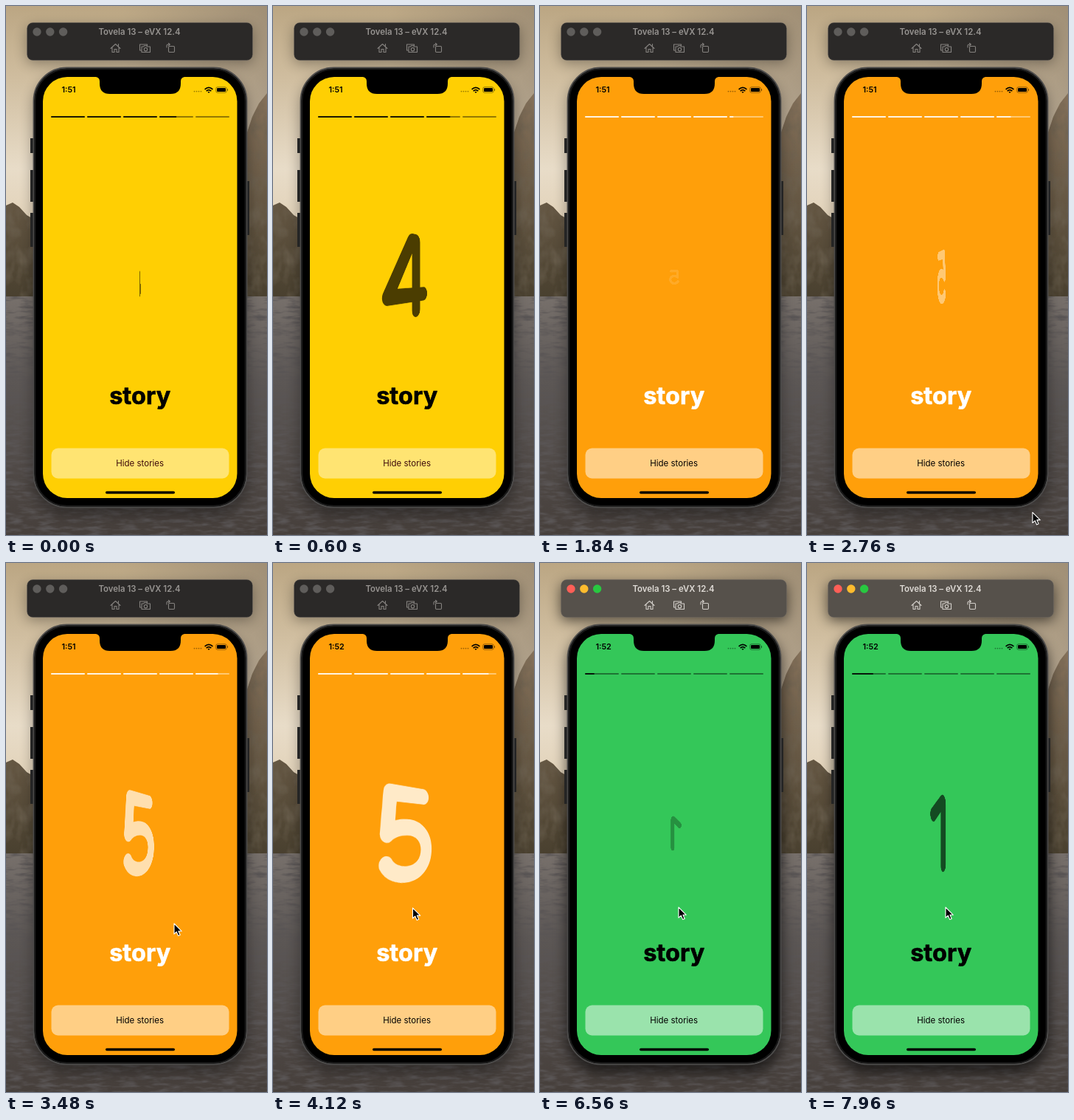
Animation, 354 px wide and 716 px high, one loop 8000 ms. Source, as an HTML page:

```html
<!DOCTYPE html>
<html lang="en">
<head>
<meta charset="utf-8">
<title>Stories</title>
<style>
  html, body { margin: 0; width: 100%; height: 100%; overflow: hidden; background: #4c4643; }
  svg { position: absolute; left: 0; top: 0; display: block; }
  text { font-family: Inter, Roboto, sans-serif; }
  #digit { left: 82px; top: 265px; overflow: visible; fill: none; stroke-linecap: round; stroke-linejoin: round; }
</style>
</head>
<body>
<svg id="back" width="354" height="716" viewBox="0 0 354 716">
  <defs>
    <linearGradient id="sky" x2="0" y2="1">
      <stop offset="0" stop-color="#bba683"/>
      <stop offset=".25" stop-color="#d0bea0"/>
      <stop offset=".55" stop-color="#e8dcc8"/>
      <stop offset="1" stop-color="#d8c3a2"/>
    </linearGradient>
    <linearGradient id="dusk">
      <stop offset=".45" stop-color="#8a7c6a" stop-opacity="0"/>
      <stop offset="1" stop-color="#8a7c6a" stop-opacity=".55"/>
    </linearGradient>
    <linearGradient id="hill" x2="0" y2="1">
      <stop offset="0" stop-color="#85715a"/>
      <stop offset="1" stop-color="#49402f"/>
    </linearGradient>
    <linearGradient id="sea" x2="0" y2="1">
      <stop offset="0" stop-color="#77706b"/>
      <stop offset=".35" stop-color="#5c5755"/>
      <stop offset="1" stop-color="#463f3b"/>
    </linearGradient>
    <filter id="waves" x="0" y="0" width="1" height="1">
      <feTurbulence type="fractalNoise" baseFrequency=".045 .2" numOctaves="3" seed="4"/>
      <feColorMatrix values="0 0 0 0 .1  0 0 0 0 .09  0 0 0 0 .09  2.6 0 0 0 -1.1"/>
    </filter>
    <filter id="rock" x="0" y="0" width="1" height="1">
      <feTurbulence type="fractalNoise" baseFrequency=".06 .04" numOctaves="3" seed="9"/>
      <feColorMatrix values="0 0 0 0 .15  0 0 0 0 .12  0 0 0 0 .08  1.8 0 0 0 -.75"/>
      <feComposite in2="SourceGraphic" operator="in"/>
    </filter>
    <filter id="soft" x="-.3" y="-.3" width="1.6" height="1.6"><feGaussianBlur stdDeviation="9"/></filter>
  </defs>

  <rect width="354" height="400" fill="url(#sky)"/>
  <rect width="354" height="400" fill="url(#dusk)"/>
  <g id="hills"></g>
  <rect y="393" width="354" height="323" fill="url(#sea)"/>
  <rect y="393" width="354" height="323" filter="url(#waves)"/>

  <g id="shadow" filter="url(#soft)">
    <rect x="28" y="28" width="307" height="50" rx="8"/>
    <rect x="36" y="92" width="292" height="598" rx="46"/>
  </g>

  <rect id="bar" x="28.5" y="22.5" width="306" height="51" rx="8" stroke="#77706a" stroke-opacity=".35"/>
  <g id="lights"></g>
  <text id="title" x="181" y="39" font-size="11.4" font-weight="600" text-anchor="middle">Tovela 13 – eVX 12.4</text>
  <g id="icons" fill="none" stroke-width="1.1" stroke-linejoin="round" stroke-linecap="round">
    <path d="M142 57.5L148.500 51.500 155 57.500M144 56.500V62.500H147V58.500H150V62.500H153V56.500M152.500 54V51.500"/>
    <path d="M183 60H181.500V52H191.500V53.500M184 55H186.500L187.500 53.800H190.500L191.500 55H195.500V62.500H184Z"/>
    <circle cx="189.500" cy="58.700" r="2.200"/>
    <rect x="220.500" y="54.500" width="8" height="8" rx="1.200"/>
    <path d="M218 56V53.500Q218 52 220 52H222M220.500 50.300L222.300 52 220.500 53.700"/>
  </g>

  <g fill="#242424">
    <path d="M33 179h5v20h-5zM33 222h5v43h-5zM33 280h5v46h-5zM326 237h4v73h-4z"/>
  </g>
  <rect x="37.500" y="83.500" width="289" height="595" rx="45" fill="#000" stroke="#4d4c4b" stroke-width="1.800"/>
  <rect x="39.500" y="85.500" width="285" height="591" rx="43" fill="none" stroke="#1b1b1b" stroke-width="1.500"/>
  <rect id="screen" x="50" y="96" width="263.500" height="570" rx="33"/>
  <path d="M122 95H242V96Q237 97 237 102V105Q237 119 223 119H141Q127 119 127 105V102Q127 97 122 96Z"/>

  <text id="clock" x="75.500" y="117.300" font-size="10.800" font-weight="600"></text>
  <g id="cell" opacity=".4"></g>
  <g fill="none" stroke="#000" stroke-width="1.700">
    <path d="M269.600 112.800Q275 107.800 280.400 112.800M271.700 115.100Q275 112 278.300 115.100"/>
    <path d="M273.500 116.300Q275 115.200 276.500 116.300L275 117.900Z" fill="#000" stroke="none"/>
    <rect x="284.700" y="109.700" width="14.600" height="7.600" rx="2.300" stroke-width=".8" opacity=".5"/>
    <path d="M300.600 112.200V114.800" stroke-width="1" opacity=".5"/>
    <rect x="286" y="111" width="12" height="5" rx="1.200" fill="#000" stroke="none"/>
  </g>
  <g id="tracks"></g>

  <text id="story" x="181.700" y="538.500" font-size="32.500" font-weight="700" text-anchor="middle" stroke-width=".7" stroke-linejoin="round">story</text>
  <rect id="button" x="61.500" y="598.500" width="241" height="41" rx="9" fill="#fff"/>
  <text id="hide" x="181.700" y="623" font-size="11.500" text-anchor="middle">Hide stories</text>
  <rect x="135" y="656.800" width="94" height="3.400" rx="1.700"/>
</svg>

<svg id="digit" width="200" height="200" viewBox="-100 -100 200 200"><path id="glyph" stroke-width="28.500"/></svg>

<svg width="354" height="716" viewBox="0 0 354 716">
  <path id="cursor" d="M0 0V14.200L3.300 11.200 5.700 16.600 8.200 15.500 5.900 10.300H10.300Z" stroke="#fff" stroke-width="1.100" stroke-linejoin="round"/>
</svg>

<script>
const LOOP = 8000;
const $ = id => document.getElementById(id);
const set = (el, attrs) => { for (const k in attrs) el.setAttribute(k, attrs[k]); return el; };
const add = (parent, tag, attrs) =>
  parent.appendChild(set(document.createElementNS('http://www.w3.org/2000/svg', tag), attrs));
const lerp = (a, b, u) => a + (b - a) * u;

const glyphs = {
  1: 'M-39 -38L6 -69Q12 -72 12 -64V70',
  4: 'M57 38H-56L14 -66Q16 -69 20 -69H30V69',
  5: 'M39 -69H-36L-43 0C-33 -8 -18 -12 0 -12C28 -12 47 5 47 28C47 53 28 70 0 70C-20 70 -38 62 -45 50'
};

// Each story: look, then [time, progress] points
const stories = [
  { n: 4, bg: '#ffcf03', ink: '#000', hide: '#3d0a0a', y: 365, glass: .44, keys: [[0, .507], [1486, 1]] },
  { n: 5, bg: '#ff9f0a', ink: '#fff', hide: '#000', y: 366.5, glass: .5, keys: [[1486, 0], [3480, .67], [5200, .955], [5420, 1]] },
  { n: 1, bg: '#34c759', ink: '#000', hide: '#000', y: 365.5, glass: .5, keys: [[5420, 0], [6560, .28], [8000, .64]] }
];
const pointer = [[2600, 318, 716], [3300, 228, 488], [3520, 228, 488], [4200, 188, 466], [LOOP, 188, 466]];
const ACTIVE = 4640, MINUTE = 4080;

// Interpolates the values of timed points
function track(keys, t, ease = u => u) {
  let i = 1;
  while (i < keys.length - 1 && t > keys[i][0]) i++;
  const [a, b] = [keys[i - 1], keys[i]];
  const u = ease(Math.min(1, Math.max(0, (t - a[0]) / (b[0] - a[0]))));
  return a.slice(1).map((v, k) => lerp(v, b[k + 1], u));
}
const smooth = u => u * u * (3 - 2 * u);

const ridges = 'M0 270L9 266 18 272 28 283 40 290 80 330 110 394H0ZM354 118L343 132 334 150 326 174 300 240 270 394H354Z';
add($('hills'), 'path', { d: ridges, fill: 'url(#hill)' });
add($('hills'), 'path', { d: ridges, filter: 'url(#rock)' });

const lights = ['#ff5f57', '#febc2e', '#28c840'].map((color, i) =>
  ({ color, el: add($('lights'), 'circle', { cx: 42 + i * 17.8, cy: 35, r: 5.7 }) }));
for (let i = 0; i < 4; i++) add($('cell'), 'circle', { cx: 255.5 + i * 3, cy: 115.6, r: .9 });

const bars = [0, 1, 2, 3, 4].map(i => {
  const box = { x: 61 + i * 49, y: 149, width: 46, height: 2, rx: 1 };
  return { rail: add($('tracks'), 'rect', { ...box, opacity: .42 }), fill: add($('tracks'), 'rect', { ...box, opacity: .8 }) };
});

function drawWindow(active) {
  set($('bar'), { fill: active ? '#56514b' : '#2b2928' });
  set($('title'), { fill: active ? '#dfdbd6' : '#979491' });
  set($('icons'), { stroke: active ? '#d3cfca' : '#85827f' });
  set($('shadow'), { opacity: active ? .6 : .32 });
  lights.forEach(l => set(l.el, { fill: active ? l.color : '#5f5d5b' }));
}

function drawStory(s, p) {
  set($('screen'), { fill: s.bg });
  set($('story'), { fill: s.ink, stroke: s.ink });
  set($('button'), { 'fill-opacity': s.glass });
  set($('hide'), { fill: s.hide });
  bars.forEach((b, i) => {
    const done = Math.min(1, Math.max(0, p + s.n - 1 - i));
    set(b.rail, { fill: s.ink });
    set(b.fill, { fill: s.ink, width: 46 * done });
  });
  set($('glyph'), { d: glyphs[s.n], stroke: s.ink });
  const d = $('digit').style;
  d.top = s.y - 100 + 'px';
  d.opacity = p;
  d.transform = `perspective(320px) rotateY(${180 * (1 - p)}deg) scale(${p})`;
}

function draw(t) {
  const story = stories.findLast(s => t >= s.keys[0][0]);
  drawWindow(t >= ACTIVE);
  drawStory(story, track(story.keys, t)[0]);
  $('clock').textContent = t < MINUTE ? '1:51' : '1:52';
  const [x, y] = track(pointer, t, smooth);
  set($('cursor'), { transform: `translate(${x} ${y})`, visibility: t < pointer[0][0] ? 'hidden' : 'visible' });
}

const start = performance.now();
function tick() {
  draw((performance.now() - start) % LOOP);
  requestAnimationFrame(tick);
}
draw(0);
requestAnimationFrame(tick);
</script>
</body>
</html>
```
